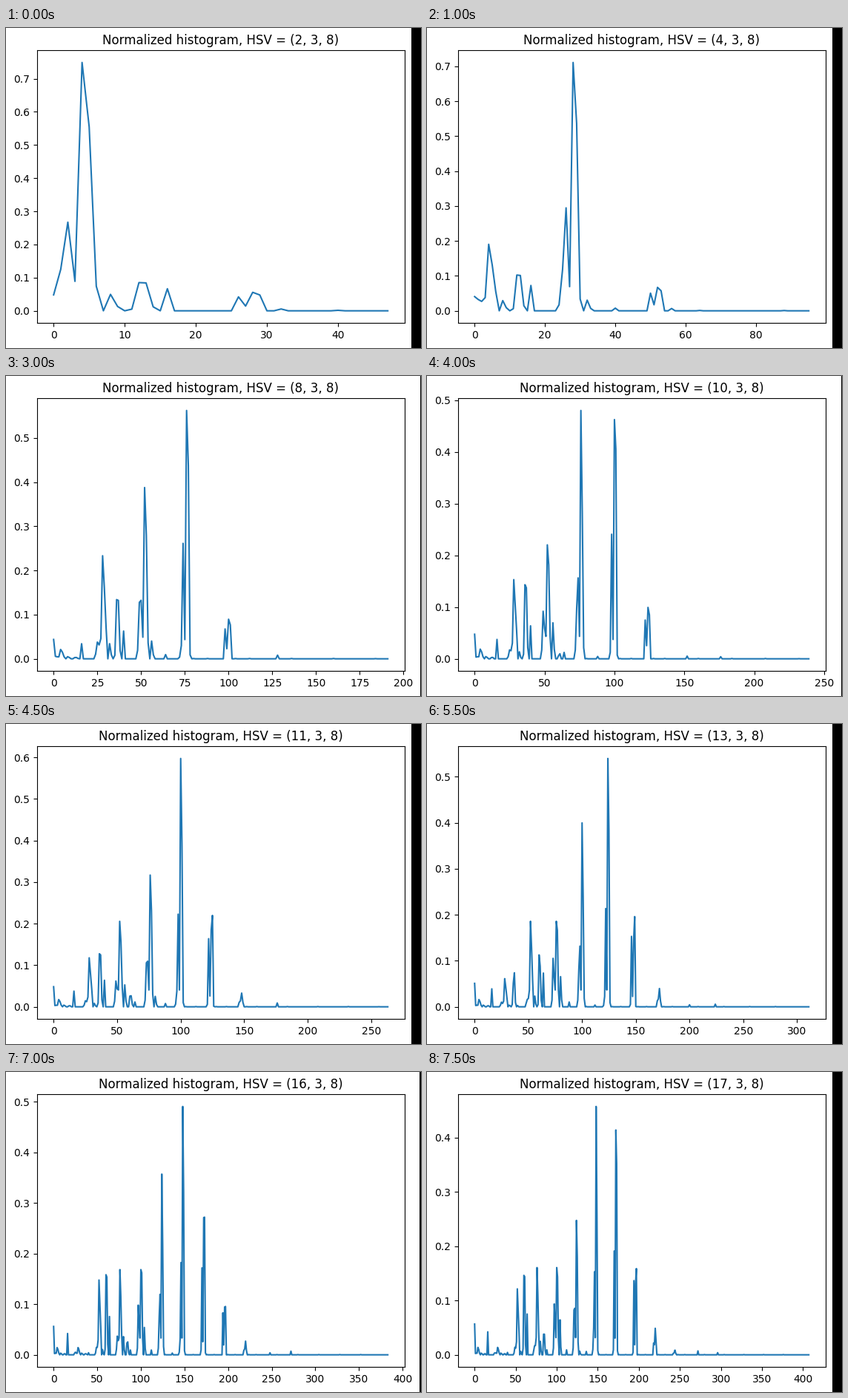
Write a matplotlib script that moves like this. It is 560 px wide and 433 px high and loops after 8 s.

```python
import matplotlib.pyplot as plt
import numpy as np
from matplotlib.animation import FuncAnimation
from matplotlib.patches import Rectangle

W, H, DPI = 560, 433, 100
PAD = 10          # blank margin right of the plot, in pixels
SV_BINS = 24      # 3 saturation x 8 value bins
FIRST_HUES = 2
FRAMES = 16

# For each saturation/value bin: (hue, pixels at or below that hue).
GROWTH = {
    0: [(6, 25), (36, 29), (72, 48)],
    1: [(20, 2), (42, 15), (60, 87), (72, 118), (90, 125)],
    2: [(24, 3), (42, 15), (60, 59), (72, 132), (84, 232), (96, 302), (108, 309)],
    3: [(24, 3), (84, 84), (108, 103)],
    4: [(24, 14), (60, 261), (66, 369), (83, 709), (96, 782), (108, 804)],
    5: [(24, 10), (45, 109), (60, 208), (72, 327), (84.5, 517), (96, 595), (108, 602)],
    6: [(24, 3), (36, 34), (60, 66), (84, 74)],
    8: [(30, 4), (42, 16), (54, 49), (120, 50), (131, 55)],
    9: [(38, 3), (54, 13)],
    11: [(24, 0), (31, 5)],
    12: [(26, 2), (30, 62), (37, 85)],
    13: [(24, 2), (30, 62), (38, 84)],
    14: [(22, 0), (36, 12)],
    16: [(6, 18), (18, 21), (30, 21.5), (31.5, 55), (60, 66), (170, 68)],
}


def histogram(bins):
    """L2-normalized histogram with the hue circle cut into equal bins."""
    edges = np.linspace(0, 180, bins + 1)
    hist = np.zeros((bins, SV_BINS))
    for k, points in GROWTH.items():
        hue, count = zip((0, 0), *points)
        hist[:, k] = np.diff(np.interp(edges, hue, count))
    return hist.ravel() / np.linalg.norm(hist)


fig = plt.figure(figsize=(W / DPI, H / DPI), dpi=DPI, facecolor="white")
ax = fig.add_axes([41.72 / W, 33.54 / H, 496 / W, 369.6 / H])
strip = fig.add_artist(Rectangle((0, 0), 1, H, transform=None, color="black",
                                 lw=0, antialiased=False))


def draw(i):
    bins = FIRST_HUES + i
    ax.clear()
    ax.plot(histogram(bins))
    ax.set_title(f"Normalized histogram, HSV = ({bins}, 3, 8)")
    # The plot is cropped tightly; black fills what is left of the stage.
    edge = min(W, int(ax.get_tightbbox().x1 + PAD))
    strip.set_x(edge)
    strip.set_width(W - edge)


anim = FuncAnimation(fig, draw, frames=FRAMES, init_func=lambda: None,
                     interval=500, repeat=True, repeat_delay=0)
plt.show()
```
